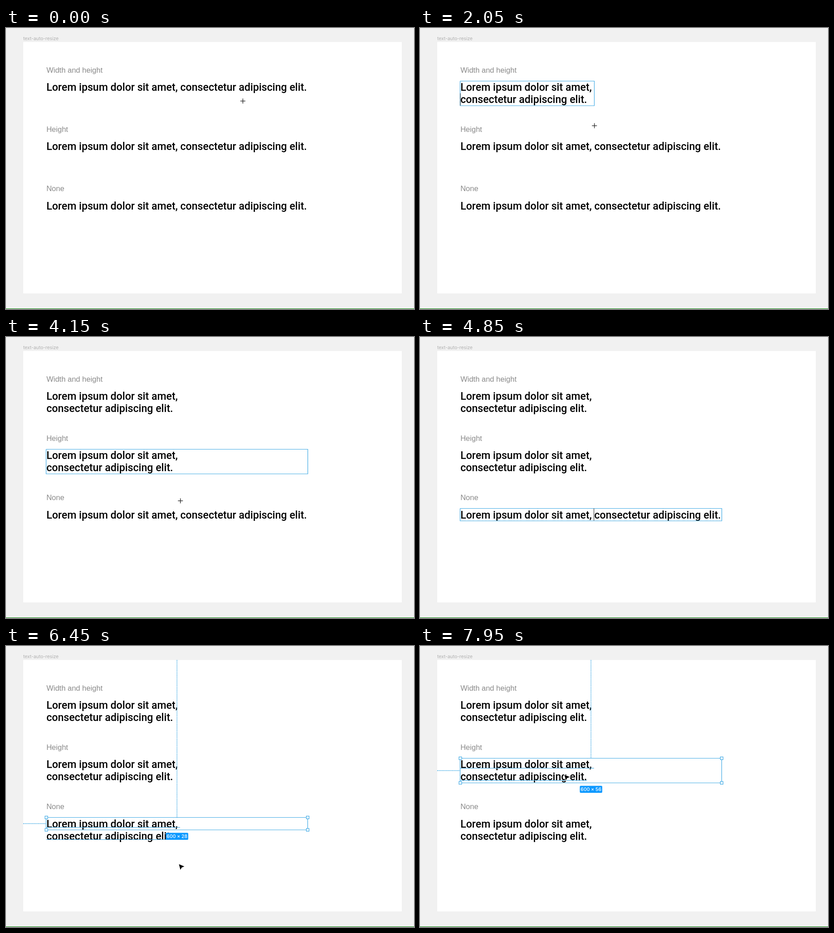
Recreate the animation shown at these times as an HTML page with a canvas. Size 900x622 px, loop 8000 ms.

```html
<!DOCTYPE html>
<html lang="en">
<head>
<meta charset="utf-8">
<title>text-auto-resize</title>
<style>
  html, body { margin: 0; height: 100%; overflow: hidden; background: #f1f1f1; }
  canvas { display: block; }
</style>
</head>
<body>
<canvas id="stage" width="900" height="622"></canvas>
<script>
const ctx = document.getElementById('stage').getContext('2d');
const LOOP = 8000, LEFT = 89.2, ROW = 131.3, LINE = 27, BLUE = '#3fa9e4';
const ESCAPE = 5700, DESELECT = 6750, RESELECT = 7850, BLINK = 500;
const FIRST = 'Lorem ipsum dolor sit amet, ', SECOND = 'consectetur adipiscing elit.';

// Each row is clicked, broken with Enter, and left; the pointer hides while typing until `wake`
const rows = [
  { label: 'Width and height', right: 664, click: 1100, enter: 1600, leave: 3050, wake: 1600 },
  { label: 'Height', right: 666, click: 3050, enter: 3500, leave: 4700, wake: 4050 },
  { label: 'None', right: 666, click: 4700, enter: 5200, leave: ESCAPE, wake: ESCAPE, fixed: true },
];

// Pointer glides: start, end, x, y
const glides = [
  [50, 850, 384, 131],
  [1600, 2400, 385, 236],
  [2450, 2750, 385, 271.5],
  [2850, 3050, 384, 264],
  [3928, 4368, 385, 394],
  [ESCAPE, 6450, 381.5, 483],
  [DESELECT, 7100, 368, 420],
  [7250, 7900, 318.5, 285],
];

const rowTop = i => Math.round(117.5 + i * ROW) - 0.5;
const boxHeight = (row, t) => t >= row.enter && !row.fixed ? 54.5 : 27.5;

function pointer(t) {
  let x = 522.5, y = 161.5;
  for (const [start, end, toX, toY] of glides) {
    const rest = 1 - Math.min(1, Math.max(0, (t - start) / (end - start)));
    x = toX + (x - toX) * rest * rest;
    y = toY + (y - toY) * rest * rest;
  }
  return [x, y];
}

function text(str, x, y, font, color) {
  ctx.font = font;
  ctx.fillStyle = color;
  ctx.fillText(str, x, y);
}

function line(points, color, width = 1, dash = []) {
  ctx.beginPath();
  points.forEach(p => ctx.lineTo(...p));
  ctx.strokeStyle = color;
  ctx.lineWidth = width;
  ctx.setLineDash(dash);
  ctx.stroke();
}

function box(i, right, height, width = 1.2, dash) {
  const y = rowTop(i), b = y + height;
  line([[88.5, y], [right, y], [right, b], [88.5, b], [88.5, y]], BLUE, width, dash);
}

function underline(i, t) {
  const y = rowTop(i) + 22;
  line([[LEFT, y], [384, y]], BLUE);
  line([[LEFT, y + LINE], [368, y + LINE]], BLUE);
}

function editing(i, t) {
  const row = rows[i], broken = t >= row.enter;
  box(i, broken && i === 0 ? 384.5 : row.right - 0.3, boxHeight(row, t));
  const since = t - (broken ? row.enter : row.click);
  if (since % (2 * BLINK) >= BLINK) return;
  const x = broken ? 89 : 383.7, y = rowTop(i) + (broken ? LINE : 0);
  line([[x, y], [x, y + LINE]], '#222');
}

function selected(i, t) {
  const y = rowTop(i), h = boxHeight(rows[i], t), mid = y + h / 2, tag = y + h + 6.5;
  underline(i);
  line([[377.2, 31], [377.2, y]], BLUE, 1.4, [2, 1.3]);
  line([[38, mid], [88, mid]], BLUE, 1.4, [2, 1.3]);
  box(i, 665.5, h);
  for (const x of [89, 665.5]) for (const cy of [y, y + h]) {
    ctx.fillStyle = '#fff';
    ctx.fillRect(x - 3, cy - 3, 6, 6);
    ctx.strokeRect(x - 3, cy - 3, 6, 6);
  }
  ctx.fillStyle = '#0d99ff';
  ctx.beginPath();
  ctx.roundRect(352.5, tag, 49.5, 15.5, 2);
  ctx.fill();
  ctx.textAlign = 'center';
  text(rows[i].fixed ? '600 × 28' : '600 × 56', 377.2, tag + 11.5, '500 10.5px Inter, sans-serif', '#fff');
  ctx.textAlign = 'left';
}

function arrow() {
  ctx.beginPath();
  [[0, 0], [12, 5], [6.2, 7.2], [3.2, 12.5]].forEach(p => ctx.lineTo(...p));
  ctx.closePath();
  ctx.strokeStyle = '#fff';
  ctx.lineWidth = 2;
  ctx.setLineDash([]);
  ctx.stroke();
  ctx.fillStyle = '#000';
  ctx.fill();
}

function beam() {
  for (const s of [-1, 1]) line([[-3, s * 7], [0, s * 5.5], [3, s * 7]], '#222');
  line([[0, -6], [0, 6]], '#222');
  line([[-1.5, 3], [1.5, 3]], '#222');
}

function cross() {
  for (const [color, width, dy] of [['#0002', 2.5, 1], ['#222', 1.1, 0]]) {
    line([[-5.5, dy], [5.5, dy]], color, width);
    line([[0, dy - 5.5], [0, dy + 5.5]], color, width);
  }
}

function draw(t) {
  ctx.fillStyle = '#f1f1f1';
  ctx.fillRect(0, 0, 900, 622);
  ctx.fillStyle = '#fff';
  ctx.fillRect(38, 31, 835, 556.5);
  ctx.fillStyle = '#008000';
  ctx.fillRect(0, 621, 900, 1);
  text('text-auto-resize', 38, 27, '10.3px Inter, sans-serif', '#b0b0b0');

  const [x, y] = pointer(t);
  const textTool = t < ESCAPE;
  const chosen = textTool || t < DESELECT ? 2 : t >= RESELECT ? 1 : -1;
  const over = rows.findIndex((row, i) => {
    const bottom = rowTop(i) + (t >= row.enter ? 2 * LINE : LINE);
    return x < row.right && y >= rowTop(i) && y <= bottom;
  });

  rows.forEach((row, i) => {
    const base = 139 + i * ROW, font = '500 23.1px Roboto, sans-serif';
    const broken = t >= row.enter;
    text(row.label, LEFT, 98.5 + i * ROW, '16.5px "Liberation Sans", Arial, sans-serif', '#8a8a8a');
    text(broken ? FIRST : FIRST + SECOND, LEFT, base, font, '#000');
    if (broken) text(SECOND, LEFT, base + LINE, font, '#000');

    if (t >= row.click && t < row.leave) editing(i, t);
    else if (!textTool && i === chosen) selected(i, t);
    else if (i === over && textTool) box(i, row.right - 0.3, boxHeight(row, t), 1, [1.5, 1]);
    else if (i === over) underline(i);
  });

  if (rows.some(row => t >= row.click + 150 && t < row.wake)) return;
  ctx.save();
  ctx.translate(x, y);
  if (!textTool) arrow();
  else if (over >= 0) beam();
  else cross();
  ctx.restore();
}

function tick(now) {
  draw(now % LOOP);
  requestAnimationFrame(tick);
}
requestAnimationFrame(tick);
</script>
</body>
</html>
```
